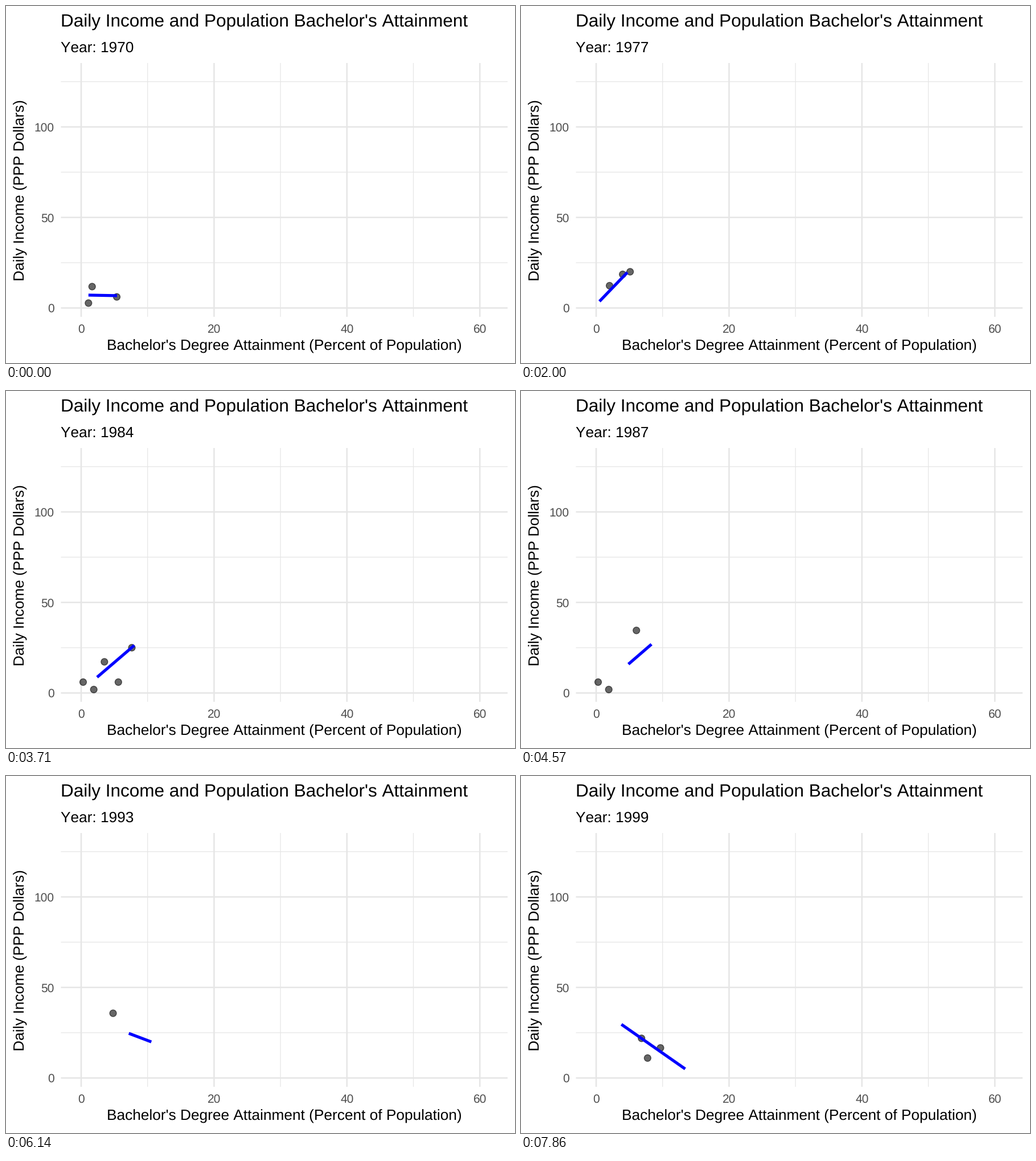
A matplotlib script for the animation above (8 s loop, 894 by 626 pixels).

```python
import numpy as np
import matplotlib.pyplot as plt
from matplotlib.animation import FuncAnimation
from matplotlib.patches import Circle

W, H, DPI = 894, 626, 100
LOOP, STEP, POSES = 8000, 40, 56
PT = 72 / DPI  # points per pixel
LEFT, RIGHT, TOP, BOTTOM = 96.5, 881, 100, 545
GRID, TICK, DOT = "#e6e6e6", "#4d4d4d", (0, 0, 0, 0.6)
BASE = 26.25

plt.rcParams.update({
    "font.family": "Liberation Sans",
    "text.hinting": "none",
    "text.kerning_factor": 6,
})

# key points in data units; everything between them glides evenly
TIMES = [0, 8, 20, 26, 37, 48, 55]
TREND_START = [(1.1, 7.1), (0.7, 4.9), (0.3, 2.4), (2.4, 8.7),
               (6.9, 21.9), (7.4, 26.9), (3.8, 29.6)]
TREND_END = [(5.4, 6.8), (4.3, 14.3), (5.1, 25), (8, 26.3),
             (8.6, 27.4), (12.2, 13.7), (13.4, 5)]
LEADER = [(1.65, 11.8), (5.08, 15), (5.14, 25), (7.63, 25),
          (4.75, 42.5), (4.85, 30.1), (6.83, 21.9)]

# (first pose, last pose): dots that stand still meanwhile
VISITS = {
    (0, 1): [(1.1, 2.7), (5.36, 6.1)],
    (19, 21): [(0.9, 3.3)],
    (24, 32): [(0.3, 6), (1.9, 1.9)],
    (25, 27): [(3.5, 17.2), (5.6, 6)],
    (54, 55): [(7.74, 11), (9.68, 16.6)],
}


def px(x):
    return 132 + 11.67 * x


def py(y):
    return 529.5 - 3.175 * y


def glide(keys, k):
    return np.array([np.interp(k, TIMES, axis) for axis in zip(*keys)])


def reports(k, start, end):
    """Two brief dots scattered about the trend on every fifth pose."""
    if k % 5 != 4 or k > 50:
        return []
    rng = np.random.default_rng(k)
    along = rng.uniform(0, 1, (2, 1))
    off = np.column_stack([np.zeros(2), rng.uniform(-4, 4, 2)])
    return list(start + along * (end - start) + off)


def pose(k):
    start, end = glide(TREND_START, k), glide(TREND_END, k)
    points = [glide(LEADER, k)] + reports(k, start, end)
    for (first, last), spots in VISITS.items():
        if first <= k <= last:
            points += spots
    return points, start, end


fig = plt.figure(figsize=(W / DPI, H / DPI), dpi=DPI, facecolor="white")
ax = fig.add_axes([0, 0, 1, 1])
ax.set_xlim(0, W)
ax.set_ylim(H, 0)
ax.axis("off")


def line(xs, ys, color, width, **kw):
    return ax.plot(xs, ys, color=color, lw=width * PT, snap=False,
                   solid_capstyle="butt", **kw)[0]


def grid(xs, ys, width):
    for y in ys:
        line([LEFT, RIGHT], [py(y)] * 2, GRID, width)
    for x in xs:
        line([px(x)] * 2, [TOP, BOTTOM], GRID, width)


def label(x, y, text, size=BASE, color="black", **kw):
    return ax.text(x, y, text, fontsize=size * PT, color=color,
                   va="baseline", **kw)


grid(range(10, 60, 20), range(25, 150, 50), 1.28)
grid(range(0, 80, 20), range(0, 150, 50), 2.56)

label(95.7, 36, "Daily Income and Population Bachelor's Attainment", 1.2 * BASE)
year = label(96, 81.2, "")
label((LEFT + RIGHT) / 2, 603.3,
      "Bachelor's Degree Attainment (Percent of Population)", ha="center")
label(32.3, (TOP + BOTTOM) / 2, "Daily Income (PPP Dollars)",
      rotation=90, rotation_mode="anchor", ha="center")
for x in range(0, 80, 20):
    label(px(x), 572.7, str(x), 0.8 * BASE, TICK, ha="center")
for y in range(0, 150, 50):
    label(84.8, py(y) + 7.6, str(y), 0.8 * BASE, TICK, ha="right")

dots = [ax.add_patch(Circle((0, 0), 5.9, fc=DOT, ec=DOT, lw=1.3 * PT, zorder=4))
        for _ in range(6)]
trend = line([], [], "#0000ff", 5.2, zorder=5)


def draw(i):
    # each pose holds for a seventh of a second
    k = ((i + 1) * STEP - 1) * POSES // LOOP
    points, start, end = pose(k)
    for n, dot in enumerate(dots):
        dot.set_visible(n < len(points))
        if n < len(points):
            x, y = points[n]
            dot.center = px(x), py(y)
    trend.set_data([px(start[0]), px(end[0])], [py(start[1]), py(end[1])])
    year.set_text(f"Year: {round(1970 + k * 53 / 99)}")
    return [*dots, trend, year]


anim = FuncAnimation(fig, draw, frames=LOOP // STEP, interval=STEP,
                     repeat=True, repeat_delay=0)
plt.show()
```
